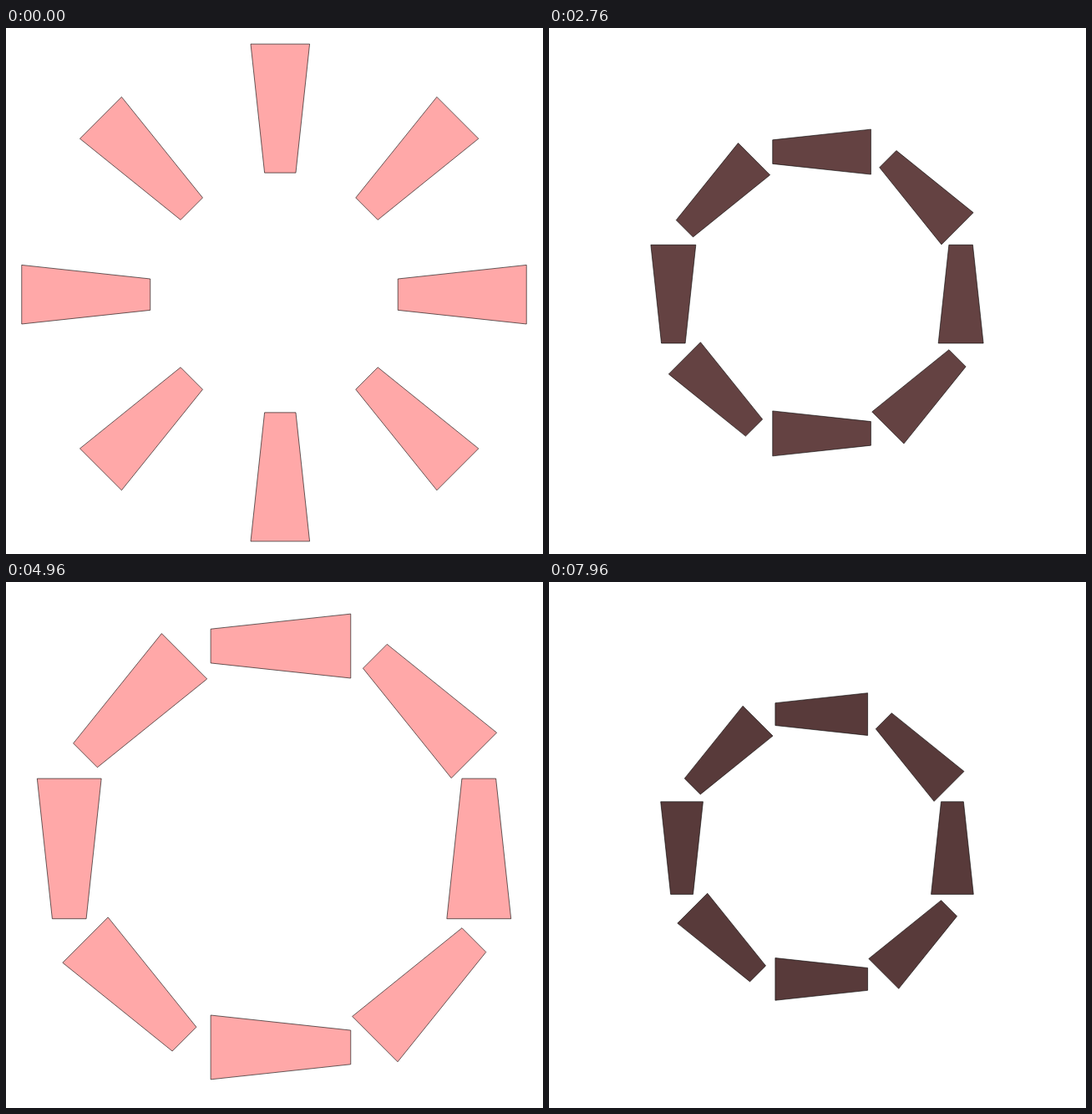
Animation, 643 px wide and 629 px high, one loop 8 s. Source, as an HTML page with a canvas:

```html
<!DOCTYPE html>
<html lang="en">
<head>
<meta charset="utf-8">
<title>Breathing ring</title>
<style>
  html, body { margin: 0; width: 100%; height: 100%; overflow: hidden; background: #fff; }
  canvas { display: block; }
</style>
</head>
<body>
<canvas id="stage" width="643" height="629"></canvas>
<script>
const ctx = document.getElementById('stage').getContext('2d');
const LOOP = 8000;
const CENTER_X = 321, CENTER_Y = 316.5;
const WEDGES = 8;
const HALF_LENGTH = 77, HALF_WIDE = 35.3, HALF_NARROW = 18.7;

// Ring size at even steps, with one extra value before and after the loop
const STEP = 800;
const BREATH = [1.14, 1, 0.827, 0.71, 0.715, 0.846, 1.004, 1.094, 1.007, 0.874, 0.75, 0.72, 0.81];

const clamp = (v, lo, hi) => Math.min(hi, Math.max(lo, v));

// Catmull-Rom curve through the breathing values
function breath(time) {
  const position = clamp(time, 0, LOOP - 1) / STEP;
  const i = Math.floor(position), u = position - i;
  const [a, b, c, d] = BREATH.slice(i, i + 4);
  return b + u / 2 * (c - a + u * (2 * a - 5 * b + 4 * c - d + u * (3 * (b - c) + d - a)));
}

function drawWedge(x, y, angle, scale) {
  ctx.save();
  ctx.translate(x, y);
  ctx.rotate(angle);
  ctx.scale(scale, scale);
  ctx.beginPath();
  ctx.moveTo(HALF_LENGTH, -HALF_WIDE);
  ctx.lineTo(HALF_LENGTH, HALF_WIDE);
  ctx.lineTo(-HALF_LENGTH, HALF_NARROW);
  ctx.lineTo(-HALF_LENGTH, -HALF_NARROW);
  ctx.closePath();
  ctx.restore();
  ctx.fill();
  ctx.stroke();
}

function draw(time) {
  const scale = breath(time);
  // Every wedge makes a quarter turn at 60 degrees per second
  const turn = clamp((time - 20) / 1000 * Math.PI / 3, 0, Math.PI / 2);
  // Brightness follows the size with a slight delay
  const light = Math.min(1, breath(time - 100) ** 3.2);
  const red = Math.round(255 * light), other = Math.round(168 * light);

  ctx.fillStyle = '#fff';
  ctx.fillRect(0, 0, 643, 629);
  ctx.fillStyle = `rgb(${red}, ${other}, ${other})`;
  ctx.strokeStyle = '#000';
  ctx.lineWidth = 0.6;
  for (let i = 0; i < WEDGES; i++) {
    const angle = i * 2 * Math.PI / WEDGES;
    const cos = Math.cos(angle), sin = Math.sin(angle);
    // A slightly wide ring whose wedges sit a little right and down
    const x = 225.3 * cos + 7.3 * Math.sqrt(Math.abs(sin));
    const y = 220.4 * sin + 2.2 * cos * cos;
    drawWedge(CENTER_X + x * scale, CENTER_Y + y * scale, angle + turn, scale);
  }
}

const start = performance.now();
function tick() {
  draw((performance.now() - start) % LOOP);
  requestAnimationFrame(tick);
}
tick();
</script>
</body>
</html>
```
